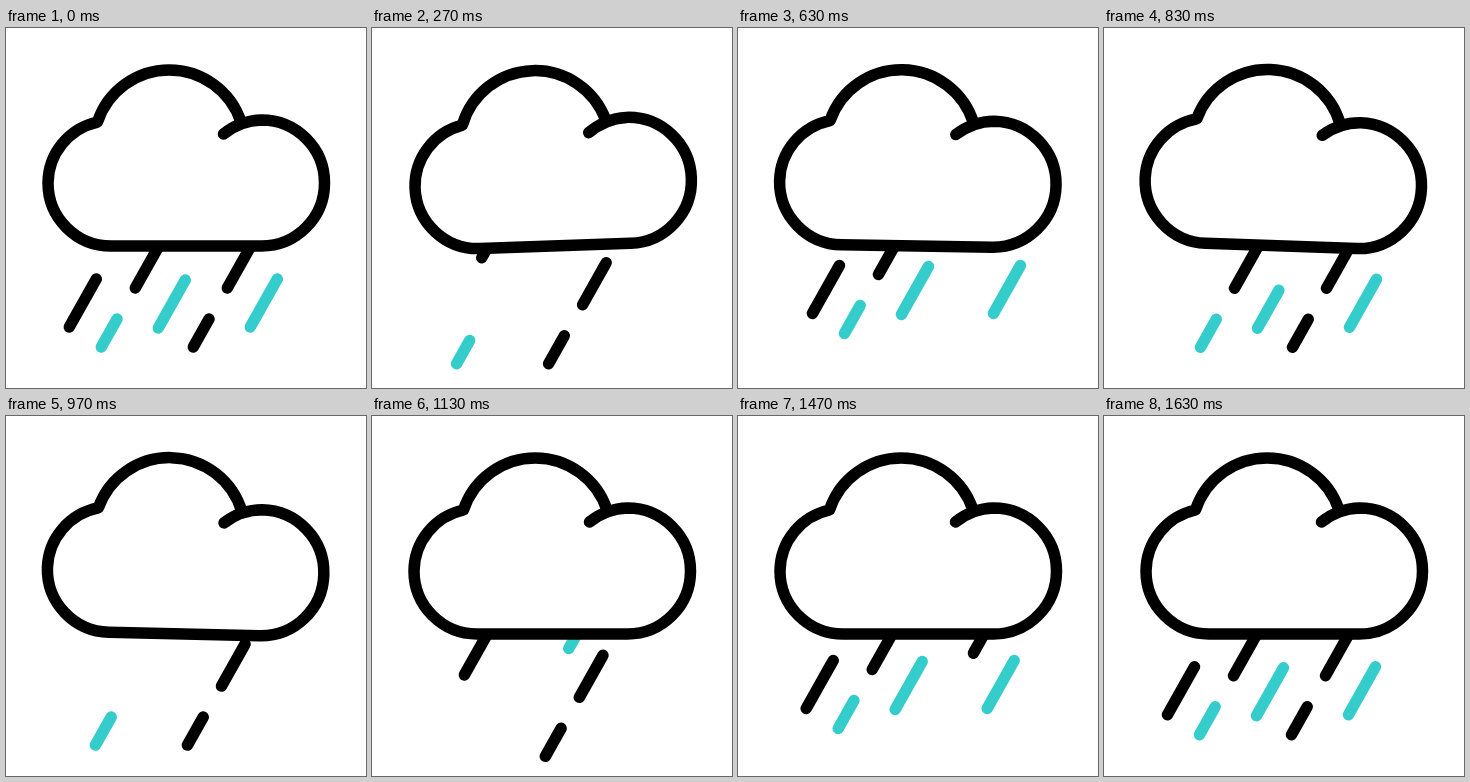
Write an HTML page that moves like this. It is 360 by 360 pixels and loops after 1.67 s.

```html
<!DOCTYPE html>
<html lang="en">
<head>
<meta charset="utf-8">
<title>Rain cloud</title>
<style>
  html, body { margin: 0; width: 100%; height: 100%; overflow: hidden; background: #fff; }
  svg { display: block; width: 100%; height: 100%; }
</style>
</head>
<body>
<svg viewBox="0 0 360 360" fill="none" stroke-width="11.5" stroke-linecap="round" stroke-linejoin="round">
  <g id="rain"></g>
  <path id="cloud" fill="#fff" stroke="#000"
    d="M217.5 106A63 63 0 0 1 255.5 92A63 63 0 0 1 255.5 218H105A63 63 0 0 1 42 155A63 63 0 0 1 91.5 94A75.5 75.5 0 0 1 235 94"/>
</svg>
<script>
const LOOP = 1670, SWAY = 1100, TRIM = 100, SLANT = 0.5625;
const BLACK = '#000', CYAN = '#35cccc';

// Each fall: vertical drift as [time, offset] steps, and the sideways drift that goes with it.
const falls = [
  { path: [[0, 0], [100, 4.5], [270, 16.7], [450, 29]], lean: -0.64, shift: 0.3 },
  { path: [[235, -41], [830, 0.2], [1240, 29]], lean: -0.72, shift: 1.7 },
  { path: [[1040, -39], [1130, -33], [1470, -6.5], [1560, -2], [1640, 0]], lean: -0.76, shift: 0.3 }
];

// Lower end at rest, height, and when each fall begins to grow (born) or shrink (dies).
const drops = [
  { x: 63, y: 299, h: 48, color: BLACK, born: [-TRIM, 235, 1046], dies: [15, 720, LOOP] },
  { x: 152, y: 300, h: 48, color: CYAN, born: [-TRIM, 300, 1103], dies: [40, 810, LOOP] },
  { x: 244, y: 299, h: 48, color: CYAN, born: [-TRIM, 350, 1180], dies: [80, 850, LOOP] },
  { x: 129, y: 260, h: 42, color: BLACK, born: [-TRIM, 400, 1240], dies: [80, 860, LOOP] },
  { x: 95, y: 319, h: 28, color: CYAN, born: [-TRIM, 470, 1290], dies: [254, 1020, LOOP] },
  { x: 221, y: 260, h: 42, color: BLACK, born: [-TRIM, 600, 1410], dies: [400, 1230, LOOP] },
  { x: 187, y: 319, h: 28, color: BLACK, born: [-TRIM, 690, 1500], dies: [475, 1310, LOOP] }
];

const clamp = v => Math.min(1, Math.max(0, v));

function valueAt(steps, t) {
  const next = steps.findIndex(s => s[0] > t);
  if (next === 0) return steps[0][1];
  if (next < 0) return steps[steps.length - 1][1];
  const [t0, v0] = steps[next - 1], [t1, v1] = steps[next];
  return v0 + (v1 - v0) * (t - t0) / (t1 - t0);
}

const rain = document.getElementById('rain');
const cloud = document.getElementById('cloud');
const streaks = drops.flatMap(drop => falls.map((fall, i) => {
  const line = document.createElementNS(rain.namespaceURI, 'path');
  line.setAttribute('stroke', drop.color);
  rain.append(line);
  return { drop, fall, line, born: drop.born[i], dies: drop.dies[i] };
}));

function drawStreak({ drop, fall, line, born, dies }, t) {
  const head = clamp((t - born) / TRIM), tail = clamp((t - dies) / TRIM);
  const visible = head > tail;
  line.style.display = visible ? '' : 'none';
  if (!visible) return;
  const dy = valueAt(fall.path, t);
  const dx = fall.shift + fall.lean * dy;
  const point = p => {
    const up = drop.h * (1 - p);
    return `${drop.x + dx + up * SLANT} ${drop.y + dy - up}`;
  };
  line.setAttribute('d', `M${point(tail)}L${point(head)}`);
}

function draw(now) {
  const t = now % LOOP;
  const angle = t < SWAY ? -2 * Math.sin(2 * Math.PI * t / SWAY) : 0;
  cloud.setAttribute('transform', `rotate(${angle} 180 128)`);
  streaks.forEach(s => drawStreak(s, t));
}

const start = performance.now();
function tick() {
  draw(performance.now() - start);
  requestAnimationFrame(tick);
}
tick();
</script>
</body>
</html>
```
